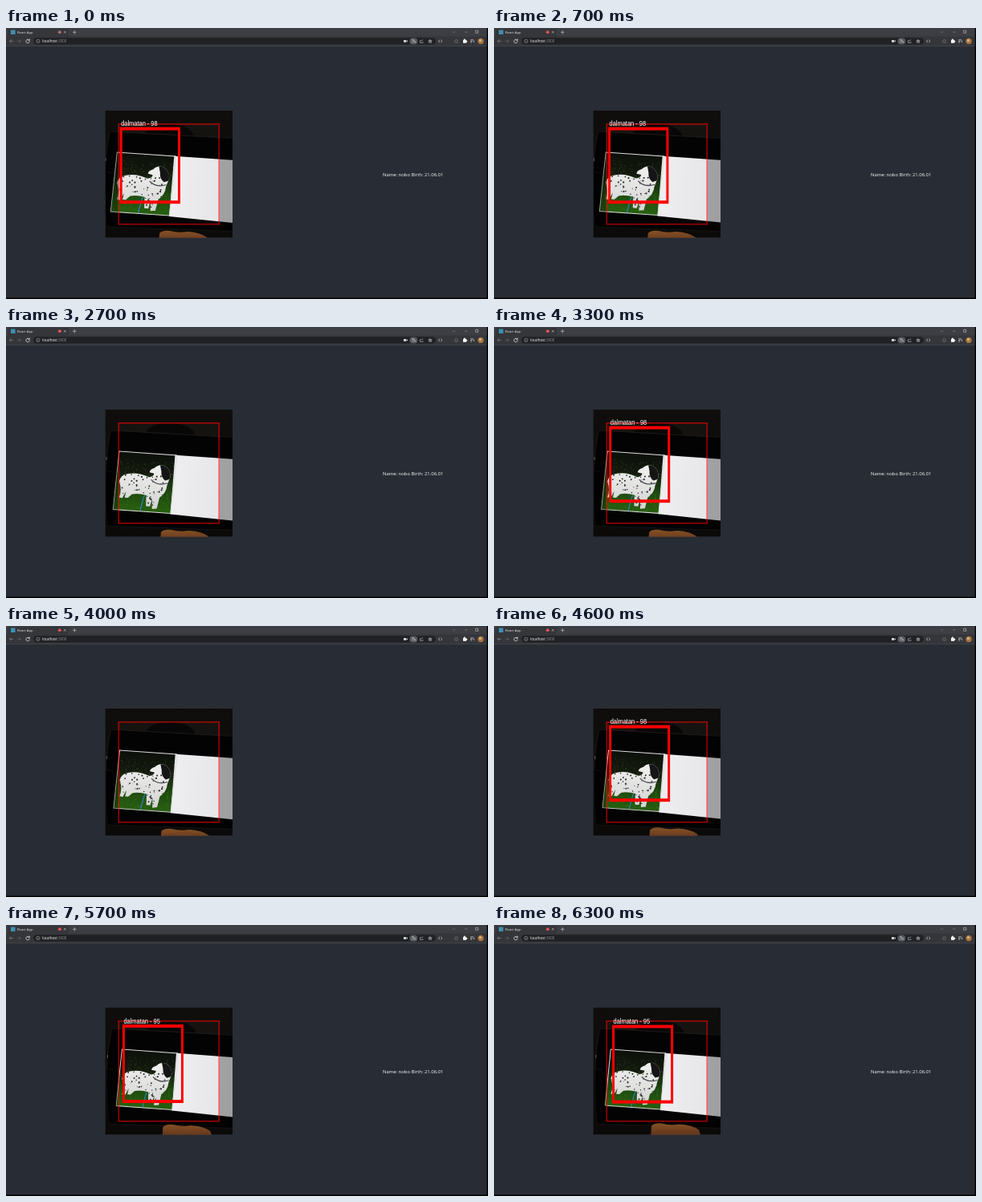
These frames come from a looping animation (600 by 338 pixels, 6.4 s). An HTML page with a canvas:

```html
<!DOCTYPE html>
<html lang="en">
<head>
<meta charset="utf-8">
<title>Detector</title>
<style>
html, body { margin: 0; width: 100%; height: 100%; overflow: hidden; background: #000; }
canvas { display: block; }
</style>
</head>
<body>
<canvas id="stage" width="600" height="338"></canvas>
<script>
const ctx = document.getElementById('stage').getContext('2d');
const LOOP = 6400, STEP = 100;
const VIEW = { x: 123.5, y: 103, size: 158.5 };

// [time, value] keys
const PAN = [[0, 0], [700, .9], [1800, 1.8], [2700, 2.6], [4000, 3.2], [5200, 5.2], [6300, 7]];
const BOX_X = [[0, 143.2], [700, 143.6], [1800, 144.8], [5200, 144.6], [6300, 148.6]];
const BOX_Y = [[0, 125.6], [5200, 125.6], [6300, 126.6]];

// [start, end] of the gaps in which the dog or the code is not recognised
const DOG_LOST = [[2400, 3000], [3700, 4500]];
const CODE_LOST = [[2100, 2500], [3800, 5400]];

const within = (spans, t) => spans.some(([start, end]) => t >= start && t < end);

function along(keys, t) {
  const i = keys.findIndex(k => k[0] > t);
  if (i < 0) return keys[keys.length - 1][1];
  const [t0, a] = keys[i - 1], [t1, b] = keys[i];
  return a + (b - a) * (t - t0) / (t1 - t0);
}

function rect(x, y, w, h, fill) {
  ctx.fillStyle = fill;
  ctx.fillRect(x, y, w, h);
}

function round(x, y, w, h, r, fill) {
  ctx.fillStyle = fill;
  ctx.beginPath();
  ctx.roundRect(x, y, w, h, r);
  ctx.fill();
}

function disc(x, y, r, fill) {
  ctx.fillStyle = fill;
  ctx.beginPath();
  ctx.arc(x, y, r, 0, 7);
  ctx.fill();
}

function line(path, color, width = .7) {
  ctx.strokeStyle = color;
  ctx.lineWidth = width;
  ctx.stroke(new Path2D(path));
}

function shape(path, fill) {
  ctx.fillStyle = fill;
  ctx.fill(new Path2D(path));
}

function text(str, x, y, size, fill, family = '"Open Sans", sans-serif', weight = 500) {
  ctx.font = `${weight} ${size}px ${family}`;
  ctx.fillStyle = fill;
  ctx.fillText(str, x, y);
}

function shade(x0, y0, x1, y1, ...colors) {
  const g = ctx.createLinearGradient(x0, y0, x1, y1);
  colors.forEach((c, i) => g.addColorStop(i / (colors.length - 1), c));
  return g;
}

function seeded(seed) {
  return () => (seed = seed * 16807 % 2147483647) / 2147483647;
}

function browser(t) {
  rect(0, 0, 600, 338, '#000');
  rect(0, 0, 598.5, 336.5, '#282c34');
  rect(0, 0, 598.5, 11, '#3d3e43');
  round(2, 1, 76, 12, 2, '#35363a');
  rect(0, 10.5, 598.5, 11.5, '#35363a');
  rect(0, 22, 598.5, .7, '#4a4c51');

  rect(6, 2.5, 5.5, 5.5, '#3f8fb0');
  text('React App', 14, 7, 4.2, '#e4e5e7');
  disc(66.8, 5.2, 2, t < 400 ? '#a5666a' : '#d84a48');
  disc(66.8, 5.2, .8, t < 400 ? '#c98a8c' : '#f08078');
  line('M72 4l2.6 2.6M74.6 4l-2.6 2.6M83 5.3h4.6M85.3 3v4.6', '#d0d1d4', .6);
  line('M556 4.4l1.5 1.5 1.5-1.5M571 5h3.4', '#8f9196', .6);
  line('M584.7 3.3h3v3h-3z', '#c8c9cc', .6);

  line('M9 16.4H4.5m2-2l-2 2 2 2', '#85878c');
  line('M14 16.4h4.5m-2-2l2 2-2 2', '#626469');
  line('M28.7 15a2.2 2.2 0 1 0 .6 1.6M29.3 13.6v1.8h-1.8', '#e8e9eb', .8);

  round(34, 12.2, 501, 8.4, 4.2, '#202124');
  line('M42 16.4a2.1 2.1 0 1 1-4.2 0a2.1 2.1 0 1 1 4.2 0M39.9 16v1.6', '#a8aaae', .6);
  text('localhost', 45, 18.1, 4.5, '#fff');
  const hostWidth = ctx.measureText('localhost').width;
  text(':3000', 45 + hostWidth, 18.1, 4.5, '#8f939a');

  rect(495, 15, 3.3, 2.8, '#d8d9db');
  shape('M498.3 16.4l1.6-1.2v2.4z', '#d8d9db');
  round(502.3, 12.4, 10, 8, 4, '#55585e');
  line('M505 15h3m-1.5-1v1m1 0q-.5 2-2.5 3M507.5 18.8l1.3-3 1.3 3', '#cfd1d4', .6);
  line('M515.5 15v3.5h3.5V17M516.7 17q0-2 2.5-2.2', '#b8babe', .6);
  shape('M528 13.8l.8 1.8 2 .1-1.5 1.3.5 2-1.8-1.1-1.8 1.1.5-2-1.5-1.3 2-.1z', '#b8babe');
  disc(528, 16.7, .8, '#202124');
  line('M540 14.8l-1.7 1.6 1.7 1.6M541.3 14.8l1.7 1.6-1.7 1.6', '#c8c9cc', .8);
  disc(560.6, 16.4, 2.5, '#55585c');
  disc(560.6, 16.4, 1.2, '#3a3c40');
  round(569, 14.8, 4, 4, .6, '#fff');
  disc(570.8, 14.6, 1, '#fff');
  disc(573.3, 16.7, 1, '#fff');
  line('M578 14.8h4M578 16.4h3M578 18h2M582.5 15.5v2.6', '#d0d1d4', .7);
  disc(591, 16.4, 3.6, '#a8763e');
  disc(590.4, 15.6, 1.6, '#d8b183');
}

const DOG = new Path2D('M4 38Q5 30 13 28Q26 24 41 30Q47 29 47 25L41 24Q41 20 47 18' +
  'Q51 13 58 14Q67 17 68 28L65 38Q65 49 57 55L55 69L49 70L48 57L46 67L41 67L40 53' +
  'Q30 51 22 53L17 58L13 58L14 50L10 59L6 58Q9 49 4 38Z');

function dogPicture() {
  ctx.save();
  ctx.beginPath();
  ctx.rect(0, 0, 73, 74);
  ctx.clip();
  rect(0, 0, 73, 74, shade(0, 0, 0, 74, '#0c100a', '#131a0d', '#1e4a10', '#286010'));
  const rnd = seeded(71);
  for (let i = 0; i < 170; i++) {
    const x = rnd() * 73, y = 8 + rnd() * 66;
    rect(x, y, .8, 1.6, y > 42 ? '#4a892b77' : '#65705566');
  }
  line('M38 53Q36 58 34 76', '#2784bd', 1.2);
  ctx.fillStyle = shade(0, 15, 0, 70, '#f0f0ee', '#d4d4d4');
  ctx.fill(DOG);
  ctx.clip(DOG);
  for (let i = 0; i < 75; i++) {
    disc(5 + rnd() * 58, 25 + rnd() * 44, .4 + rnd() * .8, '#2c2b30');
  }
  shape('M53 12L70 12L70 30L62 33Q56 29 56 22Z', '#151517');
  line('M44 33Q53 41 65 36', '#454852', 1.2);
  ctx.restore();
}

function card(p) {
  ctx.save();
  ctx.transform((73 - 4 * p) / 73, 5 / 73, (p - 8) / 74, (74 - 4 * p) / 74, 138.3 + 7 * p, 155);
  shape('M71 0H190V79L73 75Z', shade(73, 0, 150, 0, '#eeeef0', '#e4e4e8'));
  dogPicture();
  shape('M71 0H74V75H73Z', '#e8e8ea');
  ctx.strokeStyle = '#dededc';
  ctx.lineWidth = 1;
  ctx.strokeRect(0, 0, 73, 74);
  ctx.restore();
}

function camera(t) {
  const { x, y, size } = VIEW, pan = along(PAN, t), p = pan / 7;
  ctx.save();
  ctx.beginPath();
  ctx.rect(x, y, size, size);
  ctx.clip();
  rect(x, y, size, size, shade(x, y, x, y + size, '#171411', '#11100f', '#100e0d'));

  ctx.save();
  ctx.translate(pan * .4, 0);
  shape('M172 136Q174 120 202 120Q232 120 235 138Z', '#070707');
  shape('M130 129L290 138V253L126 248Q120 180 130 129Z', '#030303');
  line('M123 180Q124 140 130 129L290 138', '#24211f', .8);
  line('M123 179L132 181M126 248L290 254', '#1f1c1a', .8);
  rect(123.5, 162, 1, 4, '#88847c');
  ctx.restore();

  card(p);

  ctx.save();
  ctx.translate(190 + 5 * p, 253 - Math.max(0, p - .45) * 10);
  shape('M0 20L1 3Q5-1 14 0Q24 3 36 1Q52 2 60 8L64 20Z',
    shade(0, 0, 0, 12, '#bd7434', '#94502a'));
  ctx.restore();

  // viewfinder: shaded border with an inset line
  const edge = 16, inner = size - 2 * edge;
  ctx.strokeStyle = 'rgba(0,0,0,.3)';
  ctx.lineWidth = edge;
  ctx.strokeRect(x + edge / 2, y + edge / 2, size - edge, size - edge);
  ctx.strokeStyle = 'rgba(255,0,0,.6)';
  ctx.lineWidth = 1.6;
  ctx.strokeRect(x + edge + .8, y + edge + .8, inner - 1.6, inner - 1.6);
  ctx.restore();
}

// The overlay is a 640 x 480 surface shown in the square view.
function detection(t) {
  const sx = VIEW.size / 640, sy = VIEW.size / 480;
  const left = (along(BOX_X, t) - VIEW.x) / sx, top = (along(BOX_Y, t) - VIEW.y) / sy;
  const width = (t < 1200 ? 72.3 : 73) / sx, height = (t < 5700 ? 91.6 : 94) / sy;
  ctx.save();
  ctx.translate(VIEW.x, VIEW.y);
  ctx.scale(sx, sy);
  ctx.strokeStyle = '#f00';
  ctx.lineWidth = 12;
  ctx.strokeRect(left, top, width, height);
  text(`dalmatan - ${t < 5700 ? 98 : 95}`, left, top - 10, 30, '#fff', '"Liberation Sans", Arial, sans-serif', 400);
  ctx.restore();
}

function draw(now) {
  const t = Math.floor(now % LOOP / STEP) * STEP;
  browser(t);
  camera(t);
  if (!within(DOG_LOST, t)) detection(t);
  if (!within(CODE_LOST, t)) text('Name: nobo Birth: 21.06.01', 469, 185, 5.9, '#fff');
  requestAnimationFrame(draw);
}
requestAnimationFrame(draw);
</script>
</body>
</html>
```
